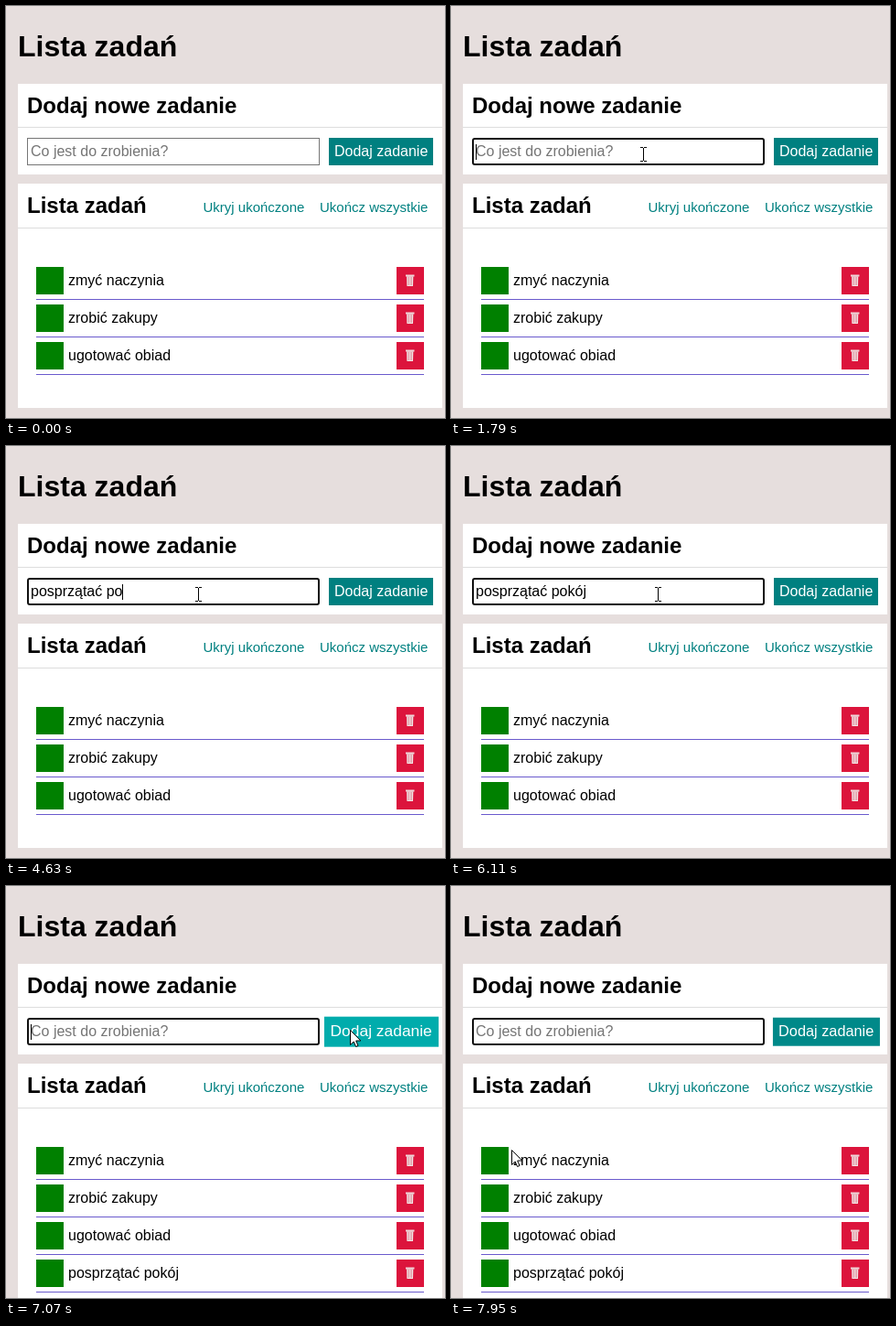
An HTML page for the animation above (8000 ms loop, 480 px wide and 450 px high).

```html
<!DOCTYPE html>
<html lang="pl">
<head>
<meta charset="utf-8">
<title>Lista zadań</title>
<style>
  html, body { margin: 0; width: 100%; height: 100%; overflow: hidden; }
  body { background: #e6dedd; font-family: "Liberation Sans", Arial, sans-serif; color: #000; }
  #stage { position: relative; width: 480px; height: 450px; overflow: hidden; background: #e6dedd; }
  #stage * { position: absolute; box-sizing: border-box; }
  .text { white-space: pre; }
  .bold { font-weight: bold; }
  .card { left: 13px; width: 464px; background: #fff; }
  .card::before { content: ""; position: absolute; left: 0; top: 47px; width: 100%; height: 1px; background: #ddd; }
  #list::before { top: 48px; }
  #input { left: 23px; top: 144px; width: 320px; height: 30px; background: #fff; border: 1px solid #767676; }
  #input.focus { border: 2px solid #101010; border-radius: 3px; }
  #caret { top: 151px; width: 1px; height: 17px; background: #000; }
  #button { left: 353px; top: 144px; width: 114px; height: 30px; background: hsl(180, 100%, 25%); color: #fff; }
  .row { left: 33px; width: 424px; height: 36px; border-bottom: 1px solid #6a5acd; }
  .done, .bin { top: 0; width: 30px; height: 30px; }
  .done { left: 0; background: #008000; }
  .bin { right: 0; background: #dc143c; }
  #cursor { left: 0; top: 0; width: 20px; height: 24px; overflow: visible; }
</style>
</head>
<body>
<div id="stage"></div>
<script>
const LOOP = 8000, BLINK = 530, FOCUS = 730, ADD = 7000;
const TYPE_START = 2060, KEY_GAP = 202;
const PHRASE = 'posprzątać pokój';
const TASKS = ['zmyć naczynia', 'zrobić zakupy', 'ugotować obiad', PHRASE];
const MOVES = [
  { from: 0, to: FOCUS, x: 210, y: 162 },
  { from: 6075, to: 6660, x: 376, y: 157 },
  { from: 7400, to: 7850, x: 66, y: 288 }
];
const stage = document.getElementById('stage');

function add(parent, className, id) {
  const el = document.createElement('div');
  el.className = className;
  if (id) el.id = id;
  parent.append(el);
  return el;
}

// Places a line of text by its baseline.
function text(parent, str, x, baseline, size, color = '', bold = false) {
  const el = add(parent, bold ? 'text bold' : 'text');
  const up = Math.round(size * 0.905), down = Math.round(size * 0.212);
  el.textContent = str;
  Object.assign(el.style, {
    left: x + 'px', top: baseline - up + 'px', fontSize: size + 'px',
    lineHeight: up + down + 'px', color
  });
  return el;
}

function card(top, height, id) {
  const el = add(stage, 'card', id);
  el.style.top = top + 'px';
  el.style.height = height + 'px';
  return el;
}

function row(name, i) {
  const el = add(stage, 'row');
  el.style.top = 285 + 41 * i + 'px';
  add(el, 'done');
  text(el, name, 35, 20, 16);
  add(el, 'bin').innerHTML = `<svg width="30" height="30" fill="none">
    <path d="M11 10 L11.5 20.5 H18 L18.5 10 Z" fill="#e3a3ae"/>
    <path d="M12 11 V20 M14.75 11 V20 M17.5 11 V20 M11.5 20.5 H18" stroke="#f3e3e3"/>
    <path d="M10 9.5 H19.5" stroke="#efd3d6" stroke-width="2"/></svg>`;
  return el;
}

text(stage, 'Lista zadań', 13, 55, 32, '', true);
card(85, 99);
text(stage, 'Dodaj nowe zadanie', 23, 117, 24, '', true);
const input = add(stage, '', 'input');
const hint = text(stage, 'Co jest do zrobienia?', 27, 164, 16, '#757575');
const typed = text(stage, '', 27, 164, 16);
const caret = add(stage, '', 'caret');
const button = add(stage, '', 'button');
text(button, 'Dodaj zadanie', 6, 20, 16);
const list = card(194, 245, 'list');
text(stage, 'Lista zadań', 23, 226, 24, '', true);
text(stage, 'Ukryj ukończone', 215.5, 225, 15, '#008080');
text(stage, 'Ukończ wszystkie', 343, 225, 15, '#008080');
const rows = TASKS.map(row);

stage.insertAdjacentHTML('beforeend', `<svg id="cursor">
  <path id="arrow" d="M.5 .5 V16.5 L4.2 13 L6.6 18.5 L9 17.5 L6.7 12 H11.8 Z" fill="#fff" stroke="#000"/>
  <path id="beam" d="M-3 -7.5 H0 M1 -7.5 H4 M.5 -7 V7 M-3 7.5 H0 M1 7.5 H4" fill="none" stroke="#000"/></svg>`);
const [cursor, arrow, beam] = ['cursor', 'arrow', 'beam'].map(id => document.getElementById(id));

// The button grows and then shrinks; the loop cuts the shrinking short.
const HOVER_END = 8440;
const idle = { transform: 'scale(1)', backgroundColor: 'hsl(180, 100%, 25%)' };
const over = { transform: 'scale(1.1)', backgroundColor: 'hsl(180, 100%, 35%)' };
const hover = button.animate([
  { ...idle, offset: 0 },
  { ...idle, offset: 6540 / HOVER_END, easing: 'ease' },
  { ...over, offset: 7440 / HOVER_END, easing: 'ease' },
  { ...idle, offset: 1 }
], { duration: HOVER_END, fill: 'both' });
hover.pause();

// Each move starts where the previous one ended and slows towards its goal.
function pointAt(t) {
  let x = 262, y = 475;
  for (const m of MOVES) {
    const k = Math.min(1, Math.max(0, (t - m.from) / (m.to - m.from)));
    const eased = Math.sin(k * Math.PI / 2);
    x += (m.x - x) * eased;
    y += (m.y - y) * eased;
  }
  return [Math.round(x), Math.round(y)];
}

function draw(t) {
  const added = t >= ADD;
  const keys = Math.floor((t - TYPE_START) / KEY_GAP) + 1;
  const count = added ? 0 : Math.min(PHRASE.length, Math.max(0, keys));
  const lastAct = added ? ADD : count ? TYPE_START + (count - 1) * KEY_GAP : FOCUS;
  const focused = t >= FOCUS;

  input.className = focused ? 'focus' : '';
  hint.hidden = count > 0;
  typed.textContent = PHRASE.slice(0, count);
  caret.hidden = !focused || Math.floor((t - lastAct) / BLINK) % 2 === 1;
  caret.style.left = Math.floor(27 + typed.getBoundingClientRect().width) + 'px';

  list.style.height = (added ? 286 : 245) + 'px';
  rows[3].hidden = !added;
  hover.currentTime = t;

  const [x, y] = pointAt(t);
  const onInput = x >= 23 && x < 343 && y >= 144 && y < 174;
  cursor.style.transform = `translate(${x}px, ${y}px)`;
  arrow.style.display = onInput ? 'none' : '';
  beam.style.display = onInput ? '' : 'none';
}

const start = performance.now();
function tick() {
  draw((performance.now() - start) % LOOP);
  requestAnimationFrame(tick);
}
tick();
</script>
</body>
</html>
```
